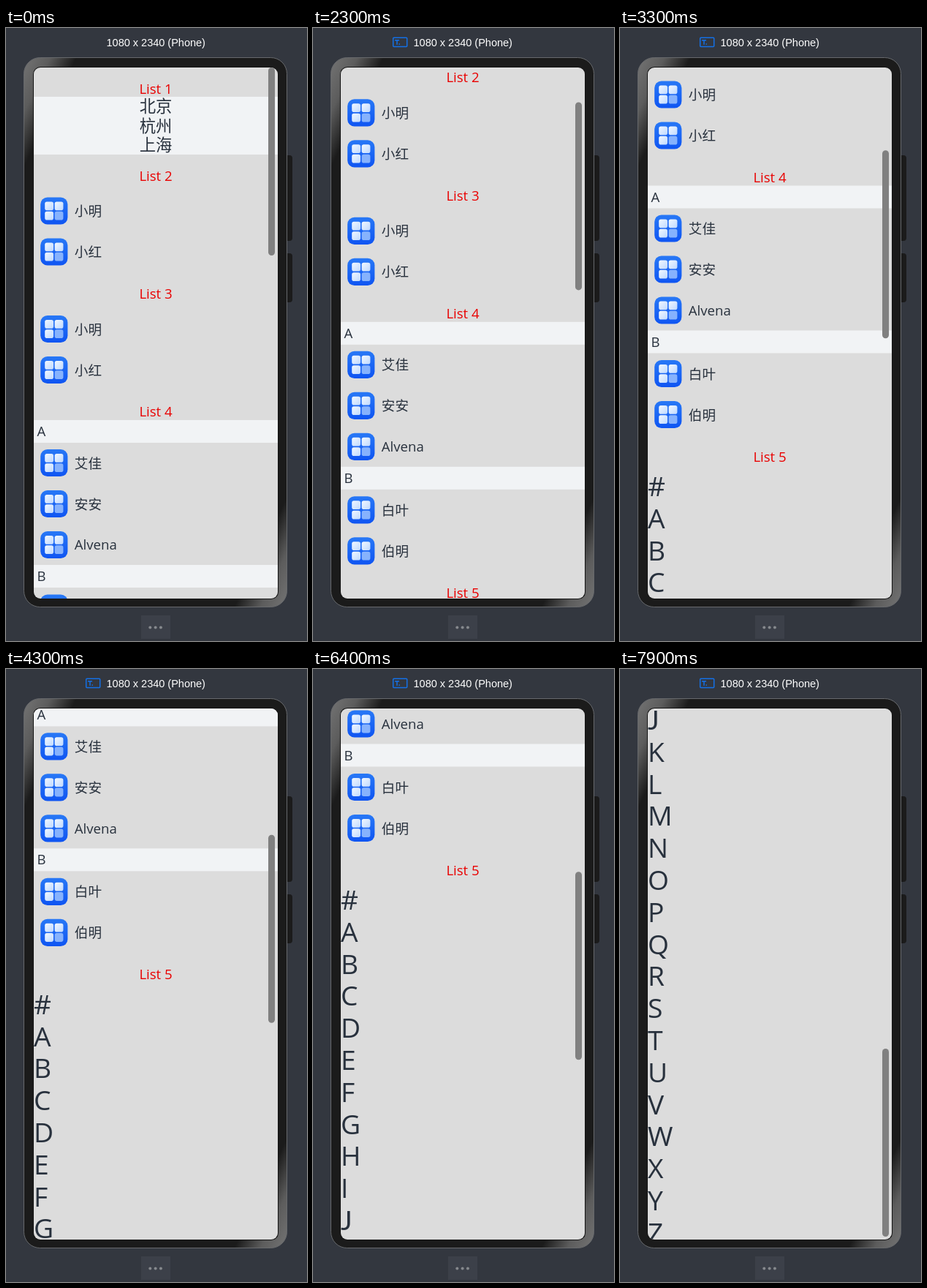
These frames come from a looping animation (412 px wide and 838 px high, 8 s). An HTML page:

```html
<!DOCTYPE html>
<html lang="zh-CN">
<head>
<meta charset="utf-8">
<title>Phone list preview</title>
<style>
  html, body { margin: 0; width: 100%; height: 100%; overflow: hidden; background: #33373f; }
  svg { display: block; width: 412px; height: 838px; }
  #content { font-family: "Open Sans", "Noto Sans CJK SC", "Noto Sans CJK", sans-serif; font-size: 18.6px; fill: #28313d; }
  .title { fill: #e90000; text-anchor: middle; }
  .city { font-size: 22.3px; text-anchor: middle; }
  .big { font-size: 37.2px; }
  .hook { font-family: Lato, sans-serif; }
  .size { font: 14.5px "Liberation Sans", Arial, sans-serif; fill: #fff; }
</style>
</head>
<body>
<svg viewBox="0 0 412 838">
  <defs>
    <linearGradient id="body" x1="0" y1="0" x2="1" y2="1">
      <stop offset="0" stop-color="#747474"/>
      <stop offset=".05" stop-color="#5c5c5c"/>
      <stop offset=".1" stop-color="#1b1b1b"/>
      <stop offset=".9" stop-color="#1b1b1b"/>
      <stop offset=".95" stop-color="#5c5c5c"/>
      <stop offset="1" stop-color="#747474"/>
    </linearGradient>
    <linearGradient id="blue" x1="0" y1="0" x2="0" y2="1">
      <stop offset="0" stop-color="#2878f6"/>
      <stop offset="1" stop-color="#0f55f2"/>
    </linearGradient>
    <linearGradient id="tile" x1="0" y1="0" x2="1" y2="1">
      <stop offset="0" stop-color="#f2f8ff"/>
      <stop offset="1" stop-color="#bfd9ff"/>
    </linearGradient>
    <clipPath id="screen"><rect x="38" y="54" width="334" height="726" rx="9"/></clipPath>
    <g id="app">
      <rect width="37.2" height="37.2" rx="9.5" fill="url(#blue)"/>
      <g fill="url(#tile)">
        <rect x="6" y="6" width="11.8" height="11.8" rx="2.8"/>
        <rect x="19.4" y="6" width="11.8" height="11.8" rx="2.8"/>
        <rect x="6" y="19.4" width="11.8" height="11.8" rx="2.8"/>
      </g>
      <rect x="19.4" y="19.4" width="11.8" height="11.8" rx="2.8" fill="#86b2fd"/>
    </g>
  </defs>

  <rect width="412" height="838" fill="#33373f"/>
  <g id="badge" fill="none" stroke="#1470e6" stroke-width="1.5">
    <rect x="109.7" y="13.2" width="19" height="12.3" rx="1"/>
    <path d="M112 16.7h6M115 16.7v6M117.5 22h1.5"/>
  </g>
  <text class="size" x="137.5" y="25">1080 x 2340 (Phone)</text>

  <path d="M384 174h4a4 4 0 0 1 4 4v109a4 4 0 0 1-4 4h-4zM384 308h4a4 4 0 0 1 4 4v59a4 4 0 0 1-4 4h-4z" fill="#1b1b1b"/>
  <rect x="24.5" y="40.5" width="360" height="751" rx="22" fill="url(#body)" stroke="#67696c"/>
  <rect x="37" y="53" width="336" height="728" rx="10" fill="#161616"/>

  <g clip-path="url(#screen)">
    <rect x="38" y="54" width="334" height="726" fill="#dcdcdc"/>
    <g id="content"></g>
    <rect id="bar" x="359" y="54" width="9" height="257" rx="4.5" fill="#808080"/>
  </g>

  <rect x="185" y="803" width="40" height="32" fill="#3c4049"/>
  <g fill="#85888d">
    <circle cx="197.3" cy="819.5" r="2"/><circle cx="204.6" cy="819.5" r="2"/><circle cx="211.9" cy="819.5" r="2"/>
  </g>
</svg>
<script>
const NS = 'http://www.w3.org/2000/svg';
const content = document.getElementById('content');
const bar = document.getElementById('bar');
const badge = document.getElementById('badge');

function add(tag, attrs, text) {
  const node = document.createElementNS(NS, tag);
  for (const key in attrs) node.setAttribute(key, attrs[key]);
  if (text) node.textContent = text;
  content.appendChild(node);
}
const band = (y, height) => add('rect', { x: 38, y, width: 334, height, fill: '#f1f3f5' });
const label = (x, y, text, cls = '') => add('text', { x, y, class: cls }, text);

function contact(mid, name) {
  add('use', { href: '#app', x: 47.2, y: mid - 18.6 });
  label(93.8, mid + (/[a-z]/.test(name) ? 6.7 : 7), name);
}
function group(y, letter, mid, names) {
  band(y, 31);
  label(42.6, y + 22, letter);
  names.forEach((name, i) => contact(mid + i * 56, name));
}

[90, 208.5, 370, 531.2, 913].forEach((y, i) => label(205, y, 'List ' + (i + 1), 'title'));
band(94, 79);
['北京', '杭州', '上海'].forEach((city, i) => label(205, 115.4 + i * 26.1, city, 'city'));
for (const mid of [250, 411.5]) ['小明', '小红'].forEach((name, i) => contact(mid + i * 56, name));
group(536, 'A', 594.5, ['艾佳', '安安', 'Alvena']);
group(734, 'B', 793, ['白叶', '伯明']);
[...'#ABCDEFGHIJKLMNOPQRSTUVWXYZ'].forEach((ch, i) =>
  label(38, 960.5 + i * 43.8, ch, ch === 'J' ? 'big hook' : 'big'));

const smooth = p => p * p * (3 - 2 * p);
const slowDown = power => p => 1 - (1 - p) ** power;

// Each swipe: start ms, end ms, final scroll offset, easing
const swipes = [
  [1400, 2600, 159, smooth],
  [2700, 3300, 320.5, smooth],
  [3400, 5100, 529, slowDown(2.18)],
  [5500, 6100, 624, smooth],
  [6200, 6600, 633, slowDown(2.58)],
  [6700, 7900, 1315.5, smooth]
];

function scrollAt(t) {
  let pos = 0;
  for (const [start, end, to, ease] of swipes) {
    if (t <= start) break;
    pos += (to - pos) * ease(Math.min(1, (t - start) / (end - start)));
  }
  return pos;
}

function draw(now) {
  // The picture advances in 100 ms steps
  const t = Math.floor((now % 8000) / 100) * 100;
  const pos = scrollAt(t);
  content.setAttribute('transform', `translate(0 ${-pos})`);
  bar.setAttribute('y', 54 + pos * 0.3535);
  badge.setAttribute('visibility', t >= 1500 ? 'visible' : 'hidden');
}

const begin = performance.now();
function tick() {
  draw(performance.now() - begin);
  requestAnimationFrame(tick);
}
tick();
</script>
</body>
</html>
```
